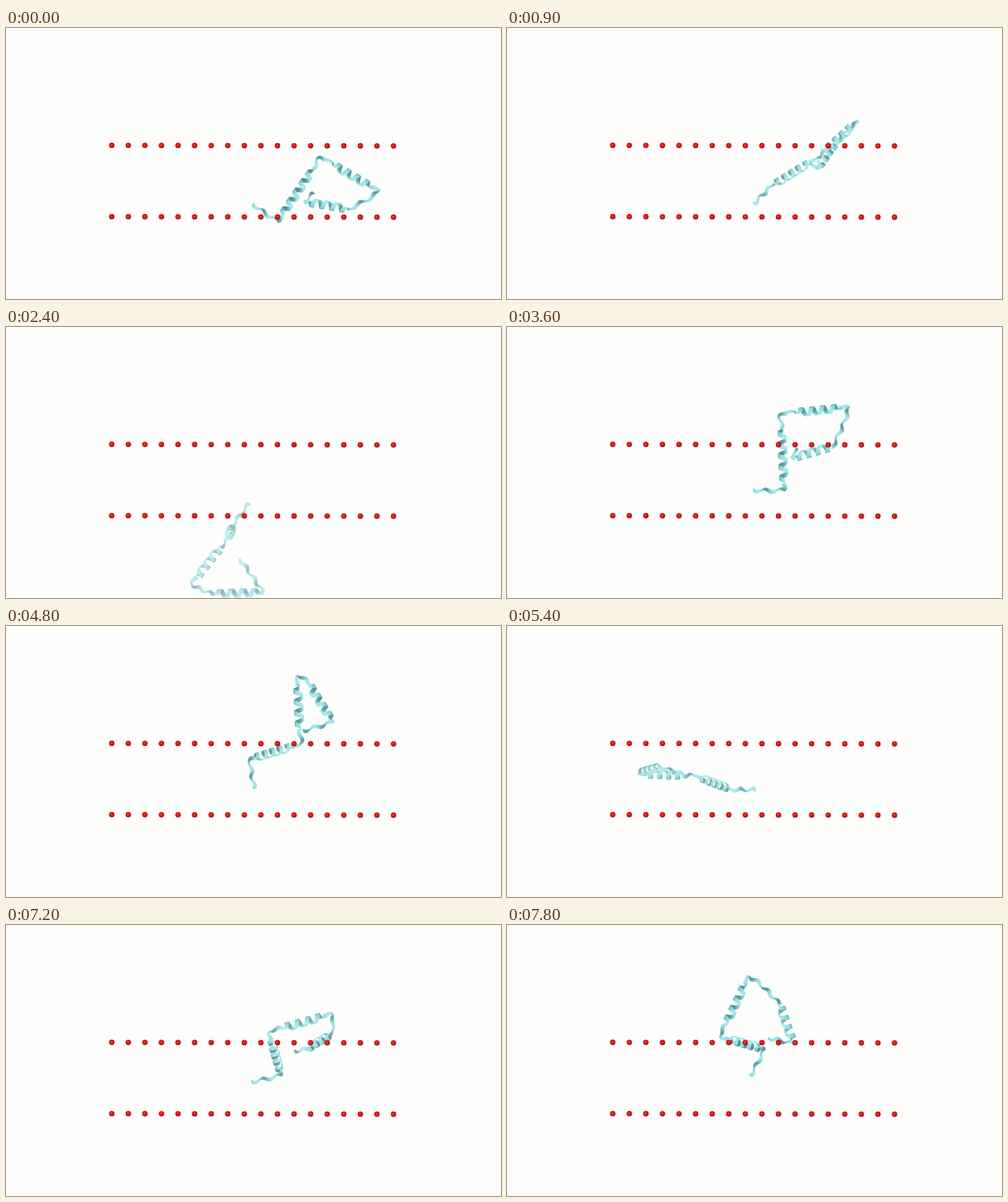
An HTML page with a canvas that plays this animation: 720 by 395 pixels, repeating every 8000 ms.

```html
<!DOCTYPE html>
<html lang="en">
<head>
<meta charset="utf-8">
<title>Protein between two membrane planes</title>
<style>
html, body { margin: 0; width: 100%; height: 100%; overflow: hidden; background: #fefefd; }
canvas { display: block; width: 720px; height: 395px; }
</style>
</head>
<body>
<canvas id="stage" width="720" height="395"></canvas>
<script>
const ctx = document.getElementById('stage').getContext('2d');
const LOOP = 8000, STEP = 300, TAU = Math.PI * 2;
const mix = (a, b, k) => a + (b - a) * k;
const between = (p, q, k) => [mix(p[0], q[0], k), mix(p[1], q[1], k)];
const dist = (p, q) => Math.hypot(q[0] - p[0], q[1] - p[1]);
const rotate = ([x, y], a) => [
  x * Math.cos(a) - y * Math.sin(a),
  x * Math.sin(a) + y * Math.cos(a)
];

// time, haze, then seven joints: tip, knee, hip, apex, bend, foot, end
const poses = [
  [0, .08, 359,257, 396,281, 458,189, 542,238, 499,264, 435,253, 448,240],
  [1500, .3, 359,256, 356,210, 458,178, 459,82, 431,116, 445,162, 425,171],
  [2400, .46, 354,257, 328,292, 324,307, 270,374, 300,389, 374,387, 340,338],
  [3600, .1, 358,238, 403,237, 399,127, 497,117, 474,174, 415,191, 422,177],
  [4800, .12, 361,237, 355,194, 428,172, 424,73, 439,82, 475,140, 432,153],
  [6300, .42, 362,242, 385,282, 455,257, 508,338, 511,316, 511,253, 463,269],
  [7800, .06, 354,220, 374,181, 310,163, 352,75, 396,114, 416,172, 380,165]
].map(([time, haze, ...xy]) => {
  const joints = [];
  while (xy.length) joints.push(xy.splice(0, 2));
  const tip = joints[0];
  return { time, haze, tip, arms: joints.map(j => [j[0] - tip[0], j[1] - tip[1]]) };
});

// Best-fit angle about the tip, always turning anticlockwise.
function swing(a, b) {
  let dot = 0, cross = 0;
  a.arms.forEach(([x, y], i) => {
    const [u, v] = b.arms[i];
    dot += x * u + y * v;
    cross += x * v - y * u;
  });
  const angle = Math.atan2(cross, dot);
  return angle > 0 ? angle - TAU : angle;
}

function poseAt(time) {
  const next = poses.findIndex((p, i) => i && time <= p.time);
  const a = poses[next - 1], b = poses[next];
  const k = (time - a.time) / (b.time - a.time), turn = swing(a, b);
  const tip = between(a.tip, b.tip, k);
  const joints = a.arms.map((arm, i) => {
    const [x, y] = rotate(between(arm, rotate(b.arms[i], -turn), k), turn * k);
    return [x + tip[0], y + tip[1]];
  });
  return { joints, haze: mix(a.haze, b.haze, k) };
}

const DARK = [56, 108, 113], MID = [108, 208, 212], LIGHT = [172, 236, 238], HAZE = [226, 240, 241];
function tint(light, haze) {
  const l = Math.max(0, Math.min(1, light)) * 2;
  const rgb = MID.map((m, i) => {
    const c = l < 1 ? mix(DARK[i], m, l) : mix(m, LIGHT[i], l - 1);
    return Math.round(mix(c, HAZE[i], haze));
  });
  return `rgb(${rgb})`;
}

// Ribbon samples: centre x, y; half width wx, wy; depth z; light.
// A helix shorter than its true length is seen tilted, as rings.
function helix(p, q, fullLength, turns) {
  const dx = q[0] - p[0], dy = q[1] - p[1], len = Math.hypot(dx, dy) || 1;
  const ax = dx / len, ay = dy / len;
  const side = Math.min(1, len / fullLength), tilt = Math.sqrt(1 - side * side);
  const count = Math.round(turns * 18), out = [];
  for (let i = 0; i <= count; i++) {
    const u = i / count, phase = u * turns * TAU;
    const r = 6.3 * Math.min(1, .2 + u * 7, .2 + (1 - u) * 7);
    const across = r * Math.cos(phase), depth = r * Math.sin(phase);
    const w = 2.9 * side + .4;
    out.push({
      x: p[0] + dx * u + ax * depth * tilt - ay * across,
      y: p[1] + dy * u + ay * depth * tilt + ax * across,
      wx: ax * w, wy: ay * w,
      z: depth * side,
      light: .5 + .33 * Math.sin(phase) + .24 * Math.cos(phase)
    });
  }
  return out;
}

// A twisting strand through the nodes, smooth at each of them.
function coil(nodes, from, to) {
  const out = [];
  const tangent = i => {
    const p = nodes[Math.max(0, i - 1)], q = nodes[Math.min(nodes.length - 1, i + 1)];
    const len = dist(p, q) || 1;
    return [(q[0] - p[0]) / len, (q[1] - p[1]) / len];
  };
  let run = 0;
  for (let i = from; i < to; i++) {
    const p = nodes[i], q = nodes[i + 1], s = tangent(i), e = tangent(i + 1);
    const gap = dist(p, q), count = Math.ceil(gap / 1.5) + 1;
    const waves = Math.round(gap / 22), sway = gap > 16 ? 2 : 0;
    const at = u => [0, 1].map(n =>
      p[n] + (q[n] - p[n]) * u * u * (3 - 2 * u) +
      gap * u * (1 - u) * (s[n] * (1 - u) - e[n] * u));
    for (let j = 0; j <= count; j++) {
      const u = j / count, c = at(u), a = at(u - .01), b = at(u + .01);
      const len = dist(a, b) || 1, nx = (a[1] - b[1]) / len, ny = (b[0] - a[0]) / len;
      const wave = sway * Math.sin(u * waves * TAU);
      const twist = (run + gap * u) / 8, w = 1.1 + 1.7 * Math.abs(Math.cos(twist));
      out.push({
        x: c[0] + nx * wave, y: c[1] + ny * wave,
        wx: nx * w, wy: ny * w, z: 0,
        light: .52 + .36 * Math.sin(twist * 2)
      });
    }
    run += gap;
  }
  return out;
}

function drawRibbon({ joints: [tip, knee, hip, apex, bend, foot, end], haze }) {
  const first = [between(knee, hip, .08), between(knee, hip, .82)];
  const second = [between(hip, apex, .22), between(hip, apex, .86)];
  const third = [between(bend, foot, .04), between(bend, foot, .95)];
  const nodes = [tip, knee, ...first, hip, ...second, apex, bend, ...third, foot, end];
  const strips = [
    coil(nodes, 0, 2), helix(...first, 82, 5),
    coil(nodes, 3, 5), helix(...second, 64, 4),
    coil(nodes, 6, 9), helix(...third, 62, 4),
    coil(nodes, 10, 12)
  ];
  const quads = strips.flatMap(s => s.slice(1).map((b, i) => [s[i], b]));
  quads.sort((m, n) => m[0].z - n[0].z);
  ctx.lineWidth = .4;
  for (const [a, b] of quads) {
    ctx.fillStyle = ctx.strokeStyle = tint((a.light + b.light) / 2, haze);
    ctx.beginPath();
    ctx.moveTo(a.x - a.wx, a.y - a.wy);
    ctx.lineTo(a.x + a.wx, a.y + a.wy);
    ctx.lineTo(b.x + b.wx, b.y + b.wy);
    ctx.lineTo(b.x - b.wx, b.y - b.wy);
    ctx.closePath();
    ctx.fill();
    ctx.stroke();
  }
}

function drawBead(x, y) {
  const g = ctx.createRadialGradient(x - .8, y - .8, .2, x, y, 4);
  g.addColorStop(0, '#f8504a');
  g.addColorStop(.35, '#ea1616');
  g.addColorStop(.75, '#d80e0e');
  g.addColorStop(1, '#8c0808');
  ctx.fillStyle = g;
  ctx.beginPath();
  ctx.arc(x, y, 3.9, 0, TAU);
  ctx.fill();
}

function draw(time) {
  ctx.fillStyle = '#fefefd';
  ctx.fillRect(0, 0, 720, 395);
  drawRibbon(poseAt(Math.floor(time / STEP) * STEP));
  for (let i = 0; i < 18; i++) {
    const x = 153.8 + i * 24.11;
    drawBead(x, 171 + i * .05);
    drawBead(x, 274.9 + i * .05);
  }
}

const start = performance.now();
function tick() {
  draw((performance.now() - start) % LOOP);
  requestAnimationFrame(tick);
}
tick();
</script>
</body>
</html>
```
